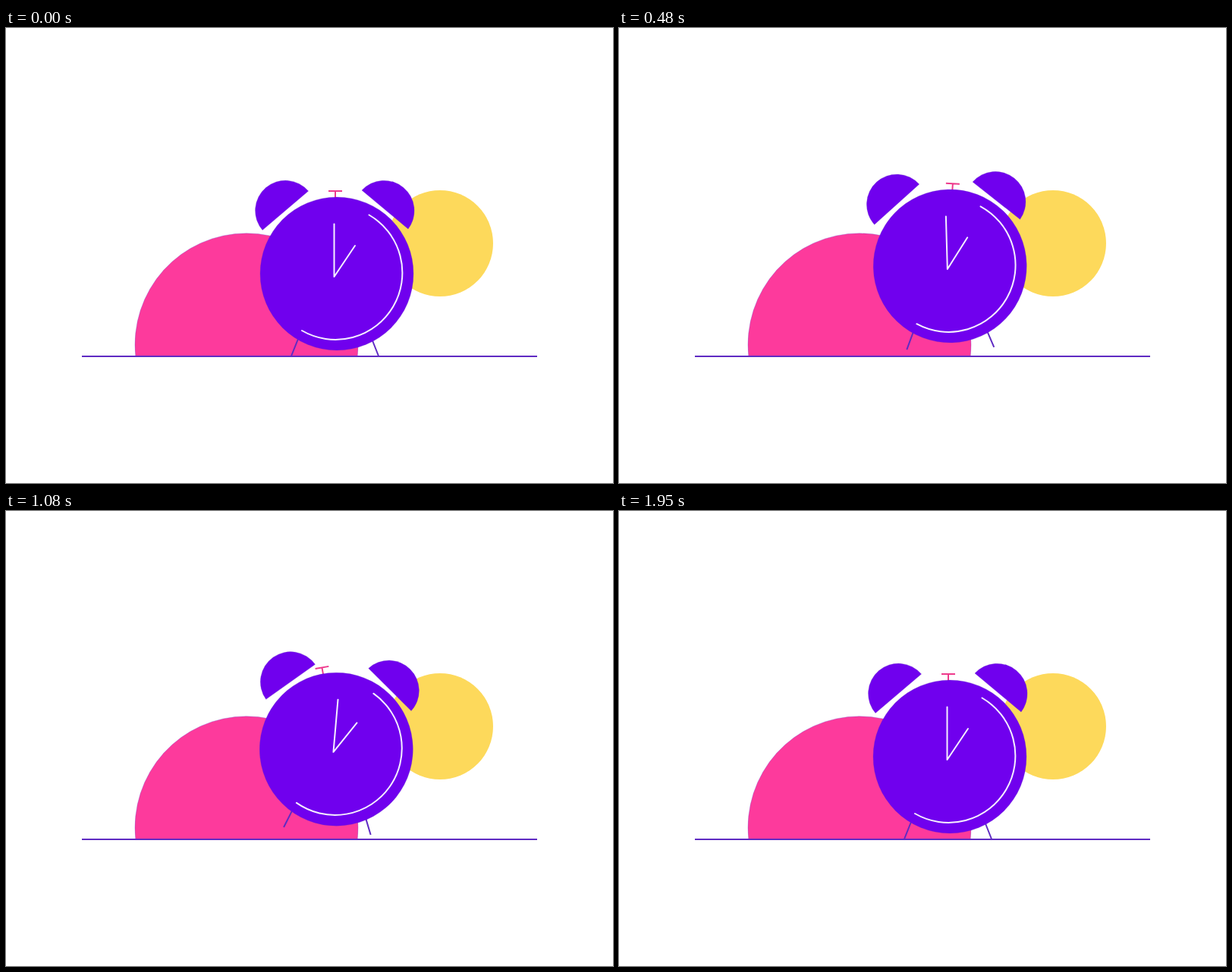
Animation, 800 px wide and 600 px high, one loop 1.98 s. Source, as an HTML page:

```html
<!DOCTYPE html>
<html lang="en">
<head>
<meta charset="utf-8">
<title>Ringing alarm clock</title>
<style>
  html, body { margin: 0; width: 100%; height: 100%; overflow: hidden; background: #fff; }
  svg { display: block; width: 100vw; height: 100vh; }
  .line { fill: none; stroke-width: 2; }
  .ink { stroke: #5f2bc3; }
  .white { stroke: #f6efff; stroke-linecap: round; stroke-linejoin: round; }
  .body { fill: #7000ee; stroke: #5f2bc3; stroke-width: .3; }
</style>
</head>
<body>
<svg viewBox="0 0 800 600">
  <circle cx="572" cy="284" r="70" fill="#fdd95b"/>
  <path d="M170.8 433A147 147 0 1 1 463.2 433Z" fill="#fd3a9c" stroke="#5f2bc3" stroke-width=".3"/>
  <path class="line ink" d="M100 433H700"/>
  <path id="knob" class="line" stroke="#ee3a8c" d="M425 215H443M434 215V224"/>
  <g id="clock">
    <path class="line ink" d="M385 410L376 432.5M482.5 411L491 432.5"/>
    <path class="body" d="M338 266.5A39.7 39.7 0 0 1 398.5 215Z"/>
    <path class="body" d="M469 214A39.8 39.8 0 0 1 530 265Z"/>
    <circle class="body" cx="436" cy="324" r="101"/>
    <path class="line white" d="M478.5 246.5A88.1 88.1 0 0 1 390 399"/>
    <path class="line white" d="M432.5 258.5V328L460 287"/>
  </g>
</svg>
<script>
  const LOOP = 1980, STEP = 30, SWING = 90;
  const LIFT_TIME = 450, FALL_START = 1080, FALL_TIME = 270;
  const PIVOT = "433.5 316";
  const clock = document.getElementById("clock");
  const knob = document.getElementById("knob");

  const clamp = v => Math.max(0, Math.min(1, v));

  // Ease out with a slight overshoot.
  function backOut(u) {
    const k = 1.70158, v = clamp(u) - 1;
    return 1 + (k + 1) * v ** 3 + k * v ** 2;
  }

  // Triangle wave between 1 and -1.
  const swing = t => 2 * Math.abs((t / SWING) % 2 - 1) - 1;

  function place(part, lift, angle) {
    part.setAttribute("transform", `translate(0 ${-lift}) rotate(${angle} ${PIVOT})`);
  }

  function draw(t) {
    const lift = 10 * (backOut(t / LIFT_TIME) - backOut((t - FALL_START) / FALL_TIME));
    const fade = clamp((FALL_START + FALL_TIME - t) / FALL_TIME);
    const wave = swing(t) * fade;
    place(clock, lift, 5 * wave * clamp(t / 495));
    place(knob, lift, -10 * wave * clamp(t / SWING));
  }

  const start = performance.now();
  function tick() {
    const t = (performance.now() - start) % LOOP;
    draw(Math.floor(t / STEP) * STEP);
    requestAnimationFrame(tick);
  }
  draw(0);
  requestAnimationFrame(tick);
</script>
</body>
</html>
```
